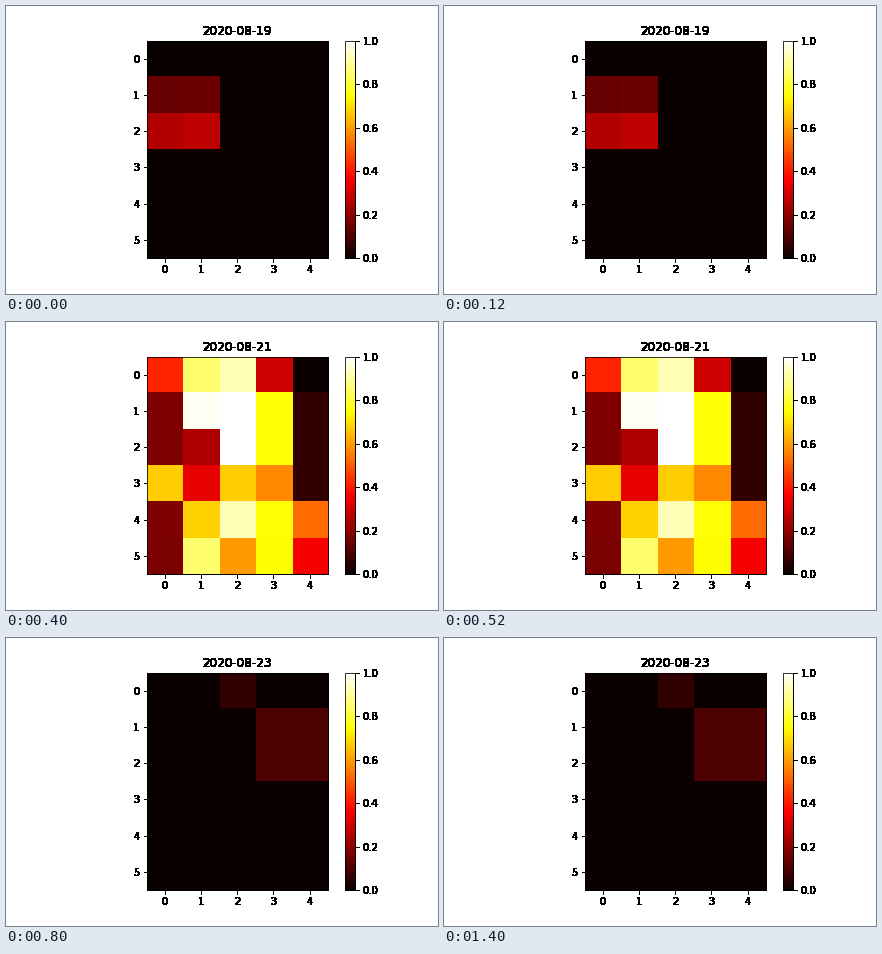
Recreate the animation shown at these times as a matplotlib script. Size 432 by 288 pixels, loop 1800 ms.

```python
import matplotlib.pyplot as plt
import numpy as np
from matplotlib.animation import FuncAnimation

ROWS, COLS = 6, 5
STEP_MS, STEPS = 200, 9  # the last day holds for five steps
R, C = np.mgrid[:ROWS, :COLS]


def spot(row, col, height, tall=0.6, wide=0.6):
    """Flat-topped bump; the default size fills a single cell."""
    return height * np.exp(-((R - row) / tall) ** 4 - ((C - col) / wide) ** 4)


def day_0():
    return spot(1.65, 0.52, 0.32, 0.72, 0.8)


def day_1():
    return (spot(1.6, 0, 0.36, tall=1.5)
            + spot(1.7, 1, 0.88, tall=0.94)
            + spot(4.05, 1, 0.56, tall=1.15)
            + spot(3.2, 2, 0.46, tall=1.75)
            + spot(2.8, 3, 0.15, tall=0.8))


def day_2():
    ridge = spot(2.5, 1.88, 0.93, 9, 1.65)
    core = spot(1.5, 1.6, 0.2, 0.85, 0.8)
    warm = (spot(0, 0, 0.25) + spot(3, 0, 0.5)
            + spot(4.3, 4, 0.47, tall=0.85))
    cool = (spot(3, 2, 0.26, wide=1.3) + spot(2.25, 1, 0.75, tall=0.8)
            + spot(0, 3.3, 0.46, wide=0.85)
            + spot(4, 1, 0.18) + spot(5, 2, 0.33))
    return ridge + core + warm - cool


def day_3():
    return (spot(0, 1, 0.12, wide=1.5)
            + spot(1.5, 2.6, 0.56, 0.85, 0.75)
            + spot(3.3, 2.6, 0.13, 0.85, 0.85)
            + spot(2, 4, 0.05))


def day_4():
    return spot(0, 2, 0.06) + spot(1.5, 3.5, 0.135, 0.8, 0.8)


DAYS = [day_0, day_1, day_2, day_3, day_4]


def harden(image, dpi):
    """Make every touched pixel opaque, for crisp heavy text and lines."""
    image = image.copy()
    image[..., 3] = image[..., 3] > 0
    return image, 0, 0


plt.rcParams.update({
    "font.family": "DejaVu Sans",
    "font.size": 10,
    "text.kerning_factor": 6,
    "figure.subplot.bottom": 0.125,
})

fig, ax = plt.subplots(figsize=(6, 4), dpi=72, facecolor="white")
heat = ax.imshow(day_0(), cmap="hot", vmin=0, vmax=1, interpolation="nearest")
ax.set_xticks(range(COLS))
ax.set_yticks(range(ROWS))
title = ax.set_title("2020-08-19", fontsize=12)
bar = fig.colorbar(heat, ax=ax, ticks=np.linspace(0, 1, 6))
for axes in (ax, bar.ax):
    axes.set_agg_filter(harden)


def update(step):
    day = min(step, len(DAYS) - 1)
    heat.set_data(DAYS[day]())
    title.set_text(f"2020-08-{19 + day}")
    return heat, title


anim = FuncAnimation(fig, update, frames=STEPS, interval=STEP_MS,
                     repeat=True, repeat_delay=0, blit=False)
plt.show()
```
